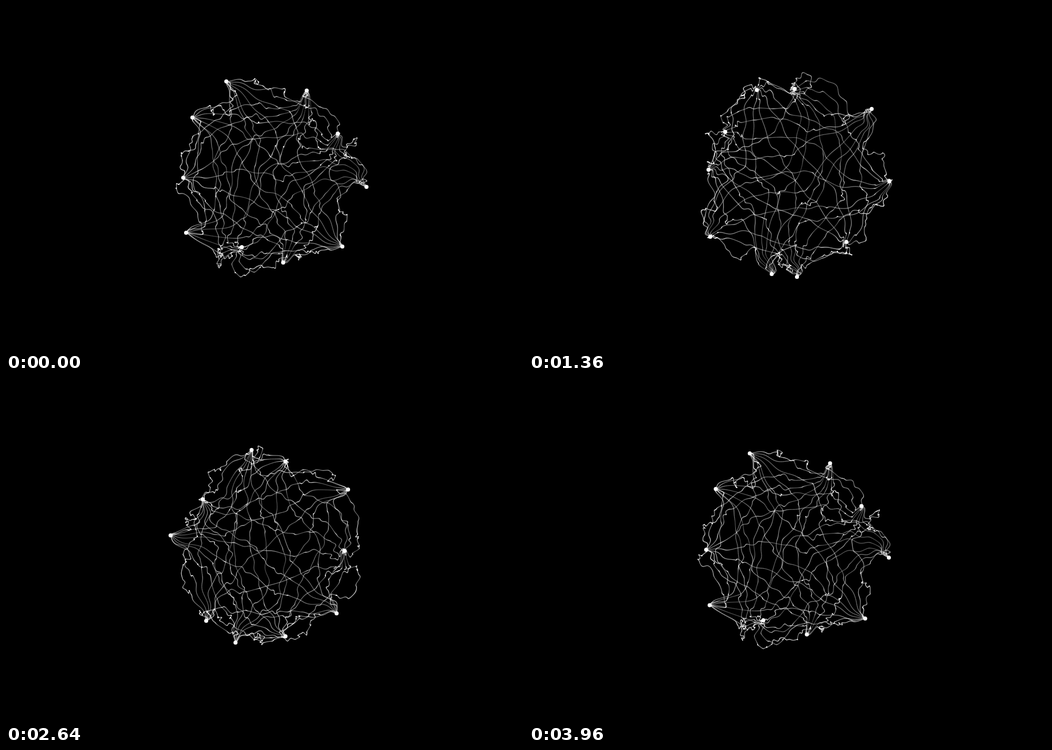
An HTML page with a canvas for the animation above (4 s loop, 900 by 600 pixels).

```html
<!DOCTYPE html>
<html lang="en">
<head>
<meta charset="utf-8">
<title>Delayed threads</title>
<style>
  html, body { margin: 0; width: 100%; height: 100%; overflow: hidden; background: #000; }
  canvas { display: block; }
</style>
</head>
<body>
<canvas id="stage" width="900" height="600"></canvas>
<script>
const LOOP = 4000, STEP = 40, SAMPLES = 500, WOBBLE = 6;
const ctx = document.getElementById('stage').getContext('2d');

// Each dot passes these points at the shared times; a third value sets its own time.
const TIMES = [0, 920, 1360, 1880, 2640, 3080];
const DOTS = [
  [[383,131], [394,126], [396,146], [394,135], [427,125], [419,129]],
  [[523,147], [473,124], [462,144], [466,134], [486,145], [495,167], [504,117,520], [520,170,3560]],
  [[577,222], [597,192], [596,179], [572,181], [595,194], [602,213], [588,236,3560]],
  [[627,315], [633,322], [627,305], [617,308], [589,301], [602,287], [603,318,2240], [625,286,3560]],
  [[585,419], [569,426], [552,411], [554,405], [575,410], [567,418]],
  [[482,447], [464,462], [466,472], [462,461], [486,450], [494,443], [463,463,520], [497,437,3560]],
  [[410,420], [407,453], [422,467], [412,446], [399,461], [391,475], [384,448,3560]],
  [[313,395], [302,393], [315,402], [327,396], [348,423], [351,426]],
  [[308,299], [312,279], [312,285], [313,283], [286,274], [299,286]],
  [[324,194], [332,211], [341,219], [326,226], [342,211], [344,188], [315,208,520]]
];

// Smooth closed curve through the keys, with a small wobble that vanishes at each key.
function makePath(points, dot) {
  const keys = points
    .map(([x, y, t], i) => ({ x, y, t: t ?? TIMES[i] }))
    .sort((a, b) => a.t - b.t);
  const count = keys.length;
  const key = i => {
    const k = keys[(i + count) % count];
    return { x: k.x, y: k.y, t: k.t + LOOP * Math.floor(i / count) };
  };
  const slope = (i, axis) => {
    const a = key(i - 1), b = key(i), c = key(i + 1);
    const before = b.t - a.t, after = c.t - b.t;
    return ((b[axis] - a[axis]) / before * after +
            (c[axis] - b[axis]) / after * before) / (before + after);
  };

  return Array.from({ length: SAMPLES }, (_, n) => {
    const t = n * LOOP / SAMPLES;
    let i = count - 1;
    while (keys[i].t > t) i--;
    const a = key(i), b = key(i + 1), span = b.t - a.t;
    const u = (t - a.t) / span, v = 1 - u;
    const wave = WOBBLE * Math.sin(Math.PI * u) * Math.sin(2 * Math.PI * u);
    const angle = dot * 2.4 + i * 1.7;
    const at = axis =>
      a[axis] * v * v * (1 + 2 * u) + b[axis] * u * u * (3 - 2 * u) +
      span * u * v * (v * slope(i, axis) - u * slope(i + 1, axis));
    return [at('x') + wave * Math.cos(angle), at('y') + wave * Math.sin(angle)];
  });
}

const paths = DOTS.map(makePath);

// Moving along a thread goes back in time for one end and towards now for the other.
function drawThread(from, to, now) {
  for (let i = 0; i <= SAMPLES; i++) {
    const s = i / SAMPLES;
    const [ax, ay] = from[(now - i + SAMPLES) % SAMPLES];
    const [bx, by] = to[(now + i) % SAMPLES];
    ctx.fillRect(ax + (bx - ax) * s - 0.1, ay + (by - ay) * s - 0.1, 1.2, 1.2);
  }
}

function draw(time) {
  const now = Math.floor(time % LOOP / STEP) * STEP * SAMPLES / LOOP;
  ctx.fillStyle = '#000';
  ctx.fillRect(0, 0, 900, 600);

  ctx.fillStyle = 'rgba(255, 255, 255, 0.33)';
  paths.forEach((from, i) => {
    for (const to of paths.slice(i + 1)) drawThread(from, to, now);
  });

  ctx.fillStyle = '#fff';
  for (const path of paths) {
    const [x, y] = path[now];
    ctx.beginPath();
    ctx.arc(x + 0.5, y + 0.5, 3.5, 0, 2 * Math.PI);
    ctx.fill();
  }
}

const start = performance.now();
function tick() {
  draw(performance.now() - start);
  requestAnimationFrame(tick);
}
tick();
</script>
</body>
</html>
```
